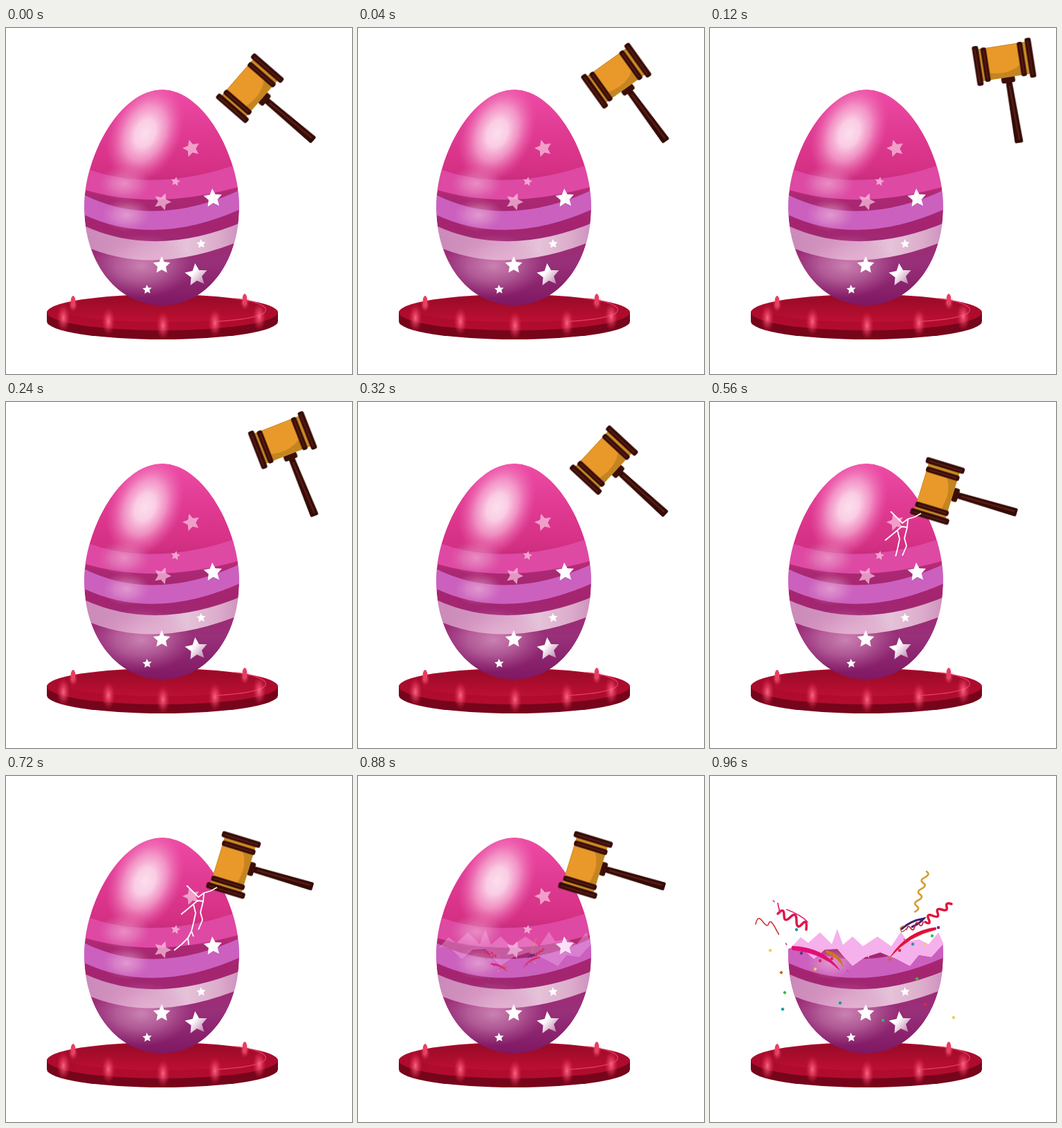
Write an HTML page that moves like this. It is 500 px wide and 500 px high and loops after 1.28 s.

```html
<!DOCTYPE html>
<html lang="en">
<head>
<meta charset="utf-8">
<title>Egg and gavel</title>
<style>
  html, body { margin: 0; width: 100%; height: 100%; overflow: hidden; background: #fff; }
  svg { display: block; width: 100vw; height: 100vh; }

  .gavel-fade, .whole, .shell, .gavel, .crack, .reveal, .confetti {
    animation: 1280ms linear infinite;
  }
  .gavel-fade, .whole { animation-name: vanish; animation-timing-function: step-end; }
  .shell { animation-name: appear; animation-timing-function: step-end; }
  .gavel { animation-name: swing; }
  .crack { animation-name: fade; }
  .reveal { animation-name: grow; transform-origin: 0 158px; }
  .confetti { animation-name: burst; transform-origin: 229px 283px; }

  @keyframes swing {
    0% { transform: translate(444.5px, 162.5px) rotate(-49deg); animation-timing-function: steps(4); }
    12.5% { transform: translate(447.5px, 167px) rotate(4.5deg); animation-timing-function: steps(6); }
    31.25%, 100% { transform: translate(443.5px, 160px) rotate(-73deg); }
  }
  @keyframes grow {
    0%, 31.25% { transform: scaleY(0); animation-timing-function: steps(4); }
    43.75% { transform: scaleY(.667); animation-timing-function: steps(4); }
    56.25%, 100% { transform: scaleY(1); }
  }
  @keyframes fade {
    0%, 56.25% { opacity: 1; animation-timing-function: steps(4); }
    68.75%, 100% { opacity: 0; }
  }
  @keyframes vanish {
    0% { opacity: 1; }
    71.875%, 100% { opacity: 0; }
  }
  @keyframes appear {
    0% { opacity: 0; }
    68.75% { opacity: .38; }
    71.875%, 100% { opacity: 1; }
  }
  @keyframes burst {
    0%, 65.625% { transform: scale(0); animation-timing-function: steps(3); }
    75%, 100% { transform: scale(1); }
  }
</style>
</head>
<body>
<svg viewBox="0 0 500 500">
  <defs>
    <linearGradient id="skin" x1="0" y1="0" x2="0" y2="1">
      <stop offset="0" stop-color="#ee4ba5"/>
      <stop offset=".2" stop-color="#e03a93"/>
      <stop offset=".38" stop-color="#d43083"/>
      <stop offset=".5" stop-color="#ab2873"/>
      <stop offset=".63" stop-color="#a4246f"/>
      <stop offset=".8" stop-color="#98307a"/>
      <stop offset="1" stop-color="#7f1762"/>
    </linearGradient>
    <radialGradient id="shine">
      <stop offset="0" stop-color="#fcdeed"/>
      <stop offset=".27" stop-color="#fbd3e7" stop-opacity=".96"/>
      <stop offset=".55" stop-color="#f7add4" stop-opacity=".75"/>
      <stop offset=".78" stop-color="#f283c0" stop-opacity=".4"/>
      <stop offset="1" stop-color="#ee60ae" stop-opacity="0"/>
    </radialGradient>
    <radialGradient id="soft">
      <stop offset="0" stop-color="#f3c6de" stop-opacity=".55"/>
      <stop offset=".5" stop-color="#eab2d4" stop-opacity=".34"/>
      <stop offset="1" stop-color="#d88cc0" stop-opacity="0"/>
    </radialGradient>
    <linearGradient id="pale">
      <stop offset="0" stop-color="#cb87b8"/>
      <stop offset=".3" stop-color="#d295c0"/>
      <stop offset=".65" stop-color="#e5c3d9"/>
      <stop offset=".85" stop-color="#dbabcb"/>
      <stop offset="1" stop-color="#ca8aba"/>
    </linearGradient>
    <linearGradient id="fadeStar" x1="0" y1="0" x2="1" y2="1">
      <stop offset=".4" stop-color="#fff"/>
      <stop offset="1" stop-color="#fff" stop-opacity=".3"/>
    </linearGradient>
    <linearGradient id="top" x1="0" y1="0" x2="0" y2="1">
      <stop offset="0" stop-color="#a60b2b"/>
      <stop offset="1" stop-color="#b20c2e"/>
    </linearGradient>
    <linearGradient id="disc" x1="0" y1="0" x2="0" y2="1">
      <stop offset="0" stop-color="#980a27"/>
      <stop offset="1" stop-color="#bd0f33"/>
    </linearGradient>
    <radialGradient id="glow">
      <stop offset="0" stop-color="#ff6f8b" stop-opacity=".9"/>
      <stop offset=".5" stop-color="#f0456a" stop-opacity=".5"/>
      <stop offset="1" stop-color="#d01840" stop-opacity="0"/>
    </radialGradient>
    <path id="outline" d="M226 89C286 89 337 185 337 258C337 342 288 401 226 401C162 401 113 342 113 258C113 185 164 89 226 89Z"/>
    <path id="star" d="M0-1L.28-.39 .95-.31 .46 .15 .59 .81 0 .48 -.59 .81 -.46 .15 -.95-.31 -.28-.39Z"/>
    <clipPath id="eggClip"><use href="#outline"/></clipPath>
    <clipPath id="bowlClip">
      <path d="M110 251L122 247 134 250 150 265 166 251 184 250 194 262 206 275 224 262 246 255 268 264 289 275 302 259 320 262 340 240V405H110Z"/>
    </clipPath>
    <clipPath id="crackClip"><rect class="reveal" x="230" y="158" width="90" height="96"/></clipPath>

    <g id="egg" clip-path="url(#eggClip)">
      <use href="#outline" fill="url(#skin)"/>
      <path d="M105 199Q212 243 345 193V227Q212 267 105 231Z" fill="#de49a3"/>
      <path d="M105 237Q212 295 345 231V259Q212 321 105 266Z" fill="#cb60bf"/>
      <path d="M105 282Q212 336 345 279V305Q208 363 105 311Z" fill="url(#pale)"/>
      <ellipse cx="171" cy="225" rx="38" ry="26" fill="url(#soft)"/>
      <ellipse cx="174" cy="270" rx="36" ry="24" fill="url(#soft)"/>
      <ellipse cx="196" cy="344" rx="74" ry="46" fill="url(#soft)"/>
      <ellipse cx="201" cy="152" rx="52" ry="76" transform="rotate(24 201 152)" fill="url(#shine)"/>
      <g id="stars"></g>
    </g>
  </defs>

  <!-- stand -->
  <path d="M59 410V424A167 26 0 0 0 393 424V410Z" fill="#76041a"/>
  <ellipse cx="226" cy="411" rx="167" ry="26" fill="url(#top)"/>
  <ellipse cx="228" cy="406" rx="148" ry="19" fill="url(#disc)"/>
  <path d="M330 391C368 395 384 405 371 413C360 419 335 422 305 424" fill="none" stroke="#e03558" stroke-width="1.5"/>
  <g id="lamps"></g>

  <g class="whole"><use href="#egg"/></g>

  <g class="shell">
    <path d="M113 255L116 249 131 233 142 241 159 226 176 243 184 221 192 244 206 232 221 246 242 232 262 246 276 225 285 239 302 236 316 243 330 226 337 241V258L289 276 246 257 206 276 176 251 150 266Z" fill="#f5b1ec"/>
    <g clip-path="url(#bowlClip)"><use href="#egg"/></g>
  </g>

  <g class="gavel-fade"><g class="gavel">
    <path d="M-5.5-90H3.5L6-2Q6 0 4 0H-4Q-6 0-6-2Z" fill="#330b07"/>
    <path d="M-1-84L1-4" stroke="#5b1d12" stroke-width="2.5"/>
    <g transform="translate(-.5 -2)">
      <rect x="-11" y="-95" width="20" height="9" rx="3" fill="#3b0f08"/>
      <rect x="-40" y="-141" width="74" height="47" fill="#c98a25"/>
      <rect x="-26" y="-140" width="46" height="45" fill="#e9992a"/>
      <path d="M-26-104Q2-97 20-110V-95H-26Z" fill="#c48420"/>
      <g fill="#350c08">
        <rect x="-46" y="-146" width="9" height="58" rx="3"/>
        <rect x="-34" y="-142" width="8" height="50" rx="3"/>
        <rect x="19" y="-142" width="8" height="50" rx="3"/>
        <rect x="31" y="-146" width="9" height="58" rx="3"/>
      </g>
      <path d="M-42-142V-92M-30-138V-96M23-138V-96M35-142V-92" stroke="#5a1b12" stroke-width="2"/>
    </g>
  </g></g>

  <g class="crack"><g clip-path="url(#crackClip)" fill="none" stroke="#fff" stroke-width="1.8" stroke-linejoin="round">
    <path d="M305 161L296 166 286 169 278 175 268 165 261 158"/>
    <path d="M286 169L285 181 277 180 264 191 253 200"/>
    <path d="M285 181L281 197 284 208 278 222"/>
    <path d="M271 186L274 198 271 212 268 224 263 234 254 243 243 252M263 234L264 244M268 224L271 232"/>
  </g></g>

  <g class="confetti" fill="none" stroke-linecap="round">
    <path d="M313 138q6 4-2.4 8.3t-2.4 8.3t-2.4 8.3t-2.4 8.3t-2.4 8.3t-2.4 8.3t-2.4 8.3" stroke="#d79b35" stroke-width="2.6"/>
    <path d="M349 185q-9-3-7 4t-7 4t-6 5t-7 4t-6 5t-5 4" stroke="#e0143c" stroke-width="3.5"/>
    <path d="M277 221Q290 209 309 206Q302 214 292 218" stroke="#3d2071" stroke-width="3"/>
    <path d="M284 222q2-8 6-2t6-3t6-3t6-3" stroke="#cf2440" stroke-width="1.8"/>
    <path d="M280 217Q272 219 277 225Q280 225 283 221" stroke="#a66a2a" stroke-width="1.3"/>
    <path d="M326 219Q285 224 261 261Q287 231 326 222Z" fill="#df1038" stroke="#df1038"/>
    <path d="M119 246Q165 248 187 280Q161 255 119 251Z" fill="#e00f74" stroke="#e00f74"/>
    <path d="M168 252Q190 258 192 275Q184 261 168 255Z" fill="#c77b18" stroke="#c77b18"/>
    <path d="M98 199q9-10 9 2t9 3t9 5t8 5t6 8" stroke="#e01549" stroke-width="3.5"/>
    <path d="M98 184L101 198M111 193Q132 201 141 211" stroke="#e0257e" stroke-width="1.8"/>
    <path d="M66 214q3-14 10-4t9 3t9 6t5 9" stroke="#cc3b37" stroke-width="1.6"/>
    <g id="bits" stroke="none"></g>
  </g>
</svg>
<script>
  const NS = 'http://www.w3.org/2000/svg';
  const add = (id, tag, attrs) => {
    const el = document.createElementNS(NS, tag);
    for (const key in attrs) el.setAttribute(key, attrs[key]);
    document.getElementById(id).appendChild(el);
  };

  // x, y, radius, turn, fill
  const pink = 'rgba(255,214,235,.65)';
  [
    [268, 174, 13, -16, pink], [245, 222, 7, 10, pink], [226, 251, 13, 20, pink],
    [299, 246, 14, -4, '#fff'], [282, 312, 7, -4, '#fff'], [225, 343, 13, 0, '#fff'],
    [275, 357, 17, -6, 'url(#fadeStar)'], [204, 378, 7, -4, '#fff']
  ].forEach(([x, y, r, turn, fill]) => add('stars', 'use', {
    href: '#star', fill, transform: `translate(${x} ${y}) rotate(${turn}) scale(${r})`
  }));

  [[83, 419], [148, 424], [227, 430], [302, 426], [366, 417]].forEach(([cx, cy]) =>
    add('lamps', 'ellipse', { cx, cy, rx: 10, ry: 21, fill: 'url(#glow)' }));
  [[97, 394], [345, 391]].forEach(([x, y]) => {
    add('lamps', 'ellipse', { cx: x, cy: y + 6, rx: 7, ry: 11, fill: 'url(#glow)' });
    add('lamps', 'path', { d: `M${x - 3} ${y + 8}V${y - 3}Q${x} ${y - 11} ${x + 3} ${y - 3}V${y + 8}Z`, fill: '#e93f60' });
  });

  const bits = {
    '#f3cf45': [87, 252, 152, 279, 352, 349, 310, 243],
    '#35bd45': [108, 313, 250, 353, 299, 293, 321, 231],
    '#1699a5': [105, 337, 125, 222, 188, 328, 293, 243],
    '#e2264d': [159, 267, 176, 264, 274, 252, 311, 330],
    '#c96b22': [103, 284, 260, 265],
    '#65308c': [330, 219, 132, 256],
    '#e33a8d': [110, 243, 199, 282, 92, 181, 281, 237]
  };
  for (const fill in bits) {
    const p = bits[fill];
    for (let i = 0; i < p.length; i += 2) {
      const x = p[i], y = p[i + 1], small = fill === '#e33a8d';
      add('bits', 'rect', {
        x: x - 2, y: y - (small ? 1 : 2), width: 4, height: small ? 1.6 : 4, rx: 1, fill,
        transform: `rotate(${(x * 7 + y) % 60} ${x} ${y})`
      });
    }
  }
</script>
</body>
</html>
```
